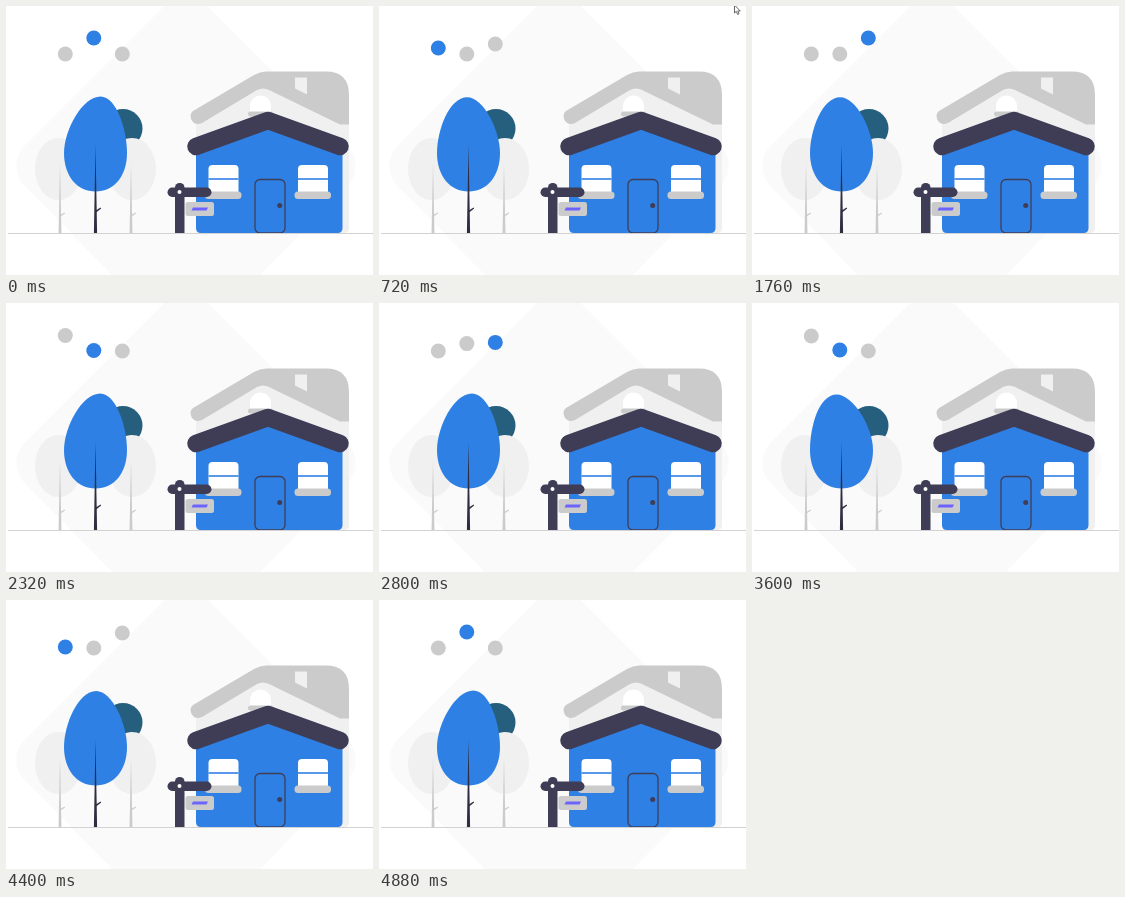
An HTML page for the animation above (4960 ms loop, 367 by 269 pixels).

```html
<!DOCTYPE html>
<html lang="en">
<head>
<meta charset="utf-8">
<title>House loader</title>
<style>
html, body { margin: 0; width: 100%; height: 100%; overflow: hidden; background: #fff; }
svg { display: block; width: 100vw; height: 100vh; }
.blue { fill: #2f80e4; }
.pale { fill: #f0f0f0; }
.grey { fill: #cbcbcb; }
.navy { fill: #3f3d56; }
</style>
</head>
<body>
<svg viewBox="0 0 367 269" preserveAspectRatio="none">
  <defs>
    <g id="trunk">
      <path d="M0 -88 L1.6 0 H-1.6 Z"/>
      <path d="M.4 -22.5 L5 -25.5 L5.6 -24.4 L.6 -20.5 Z"/>
    </g>
    <g id="window">
      <path fill="#fff" d="M0 27 V4 Q0 0 4 0 H26 Q30 0 30 4 V27 Z"/>
      <path stroke="#2f80e4" stroke-width="1.6" d="M0 14 H30"/>
      <rect class="grey" x="-3.5" y="26.5" width="36.5" height="7.5" rx="3.5"/>
    </g>
  </defs>

  <rect x="51.5" y="31.5" width="257" height="257" rx="29" fill="#fafafa" transform="rotate(45 180 160)"/>

  <!-- rear house -->
  <path class="pale" d="M190 118 L257 78 L343 112 V222 Q343 227 338 227 H190 Z"/>
  <path class="grey" d="M187 105 L248 69 Q254 65.500 260 65.500 H320 Q343 65.500 343 89 V118.500 H334 L263 84 Q257 81 251 84 L196 117 Q189 120 185.500 114 Q183 108 187 105 Z"/>
  <path class="pale" d="M289 71.500 H301 V88.500 L289 82.500 Z"/>
  <path fill="#fff" d="M244 106 V100 A10.500 10.500 0 0 1 265 100 V106 Z"/>
  <rect class="grey" x="242" y="105.500" width="25" height="5" rx="2.500"/>

  <!-- front house -->
  <path class="blue" d="M190 143 L262 118 L336.500 143 V222 Q336.500 227 331.500 227 H195 Q190 227 190 222 Z"/>
  <path d="M190 140.500 L262 114.500 L334 140.500" fill="none" stroke="#3f3d56" stroke-width="17.500" stroke-linecap="round" stroke-linejoin="round"/>
  <use href="#window" x="202.500" y="159"/>
  <use href="#window" x="292" y="159"/>
  <rect x="249" y="173.500" width="30" height="53.500" rx="5" fill="none" stroke="#3f3d56" stroke-width="1.300"/>
  <circle class="navy" cx="273.700" cy="199.500" r="2.500"/>

  <!-- trees -->
  <circle cx="117" cy="122.500" r="19.500" fill="#265e7d"/>
  <ellipse class="pale" cx="52.500" cy="163" rx="23.500" ry="31"/>
  <ellipse class="pale" cx="126" cy="163" rx="24" ry="31"/>
  <use href="#trunk" class="grey" transform="translate(54 227) scale(.9 .8)"/>
  <use href="#trunk" class="grey" transform="translate(125 227) scale(.9 .8)"/>
  <path id="crown" class="blue"/>
  <use href="#trunk" fill="#2f2e41" x="89.500" y="227"/>

  <!-- sign -->
  <rect class="navy" x="169" y="177" width="9.500" height="54" rx="4.500"/>
  <rect class="navy" x="161.500" y="181.500" width="44" height="9.500" rx="4.700"/>
  <circle cx="173.500" cy="186" r="2" fill="#fff"/>
  <rect class="grey" x="179.500" y="196" width="28.500" height="14" rx="2.500"/>
  <path fill="#6c63ff" d="M187 201.500 H202 L200.500 204.500 H185.500 Z"/>

  <rect y="227.500" width="367" height="41.500" fill="#fff"/>
  <path fill="#fafafa" d="M65.500 227.500 H294.500 L254 269 H106 Z"/>
  <path stroke="#d2d2d2" d="M2 227.500 H367"/>

  <g id="dots">
    <circle cx="59.300" r="7.500"/>
    <circle cx="87.800" r="7.500"/>
    <circle cx="116.300" r="7.500"/>
  </g>
  <path id="pointer" fill="#fff" stroke="#555" stroke-width=".9" d="M355.500 -1 V7 L357.300 5.400 L358.600 8.400 L360 7.800 L358.800 5 H361.300 Z"/>
</svg>
<script>
const LOOP = 4960, HOP = 160, REST = 48, LIFT = 16;
// Moments at which the raised dot hands over to the next one
const hops = [241, 654, 1067, 1479, 1892, 2304, 2717, 3147, 3576, 3976, 4376, 4720];
const dots = document.querySelectorAll('#dots circle');
const crown = document.getElementById('crown');
const pointer = document.getElementById('pointer');

const ease = u => u * u * (3 - 2 * u);

function drawDots(t) {
  const done = hops.filter(h => h <= t).length;
  const p = done ? ease(Math.min(1, (t - hops[done - 1]) / HOP)) : 1;
  const active = (done + 1) % 3, last = done % 3;
  dots.forEach((dot, i) => {
    const lift = i === active ? p : i === last ? 1 - p : 0;
    dot.setAttribute('cy', REST - LIFT * lift);
    dot.setAttribute('class', i === active ? 'blue' : 'grey');
  });
}

function drawCrown(t) {
  const sway = Math.cos(4 * Math.PI * t / LOOP);
  const x = 89.5 + 5 * sway, y = 91 - .6 * sway;
  crown.setAttribute('d',
    `M${x} ${y} C${x + 16} ${y} 121 124 121 147 C121 170 108 185.500 89.500 185.500` +
    ` C71 185.500 58 170 58 147 C58 124 ${x - 18} ${y} ${x} ${y} Z`);
}

function frame() {
  const t = performance.now() % LOOP;
  drawDots(t);
  drawCrown(t);
  pointer.style.visibility = t >= 640 && t < 800 ? 'visible' : 'hidden';
  requestAnimationFrame(frame);
}
frame();
</script>
</body>
</html>
```
